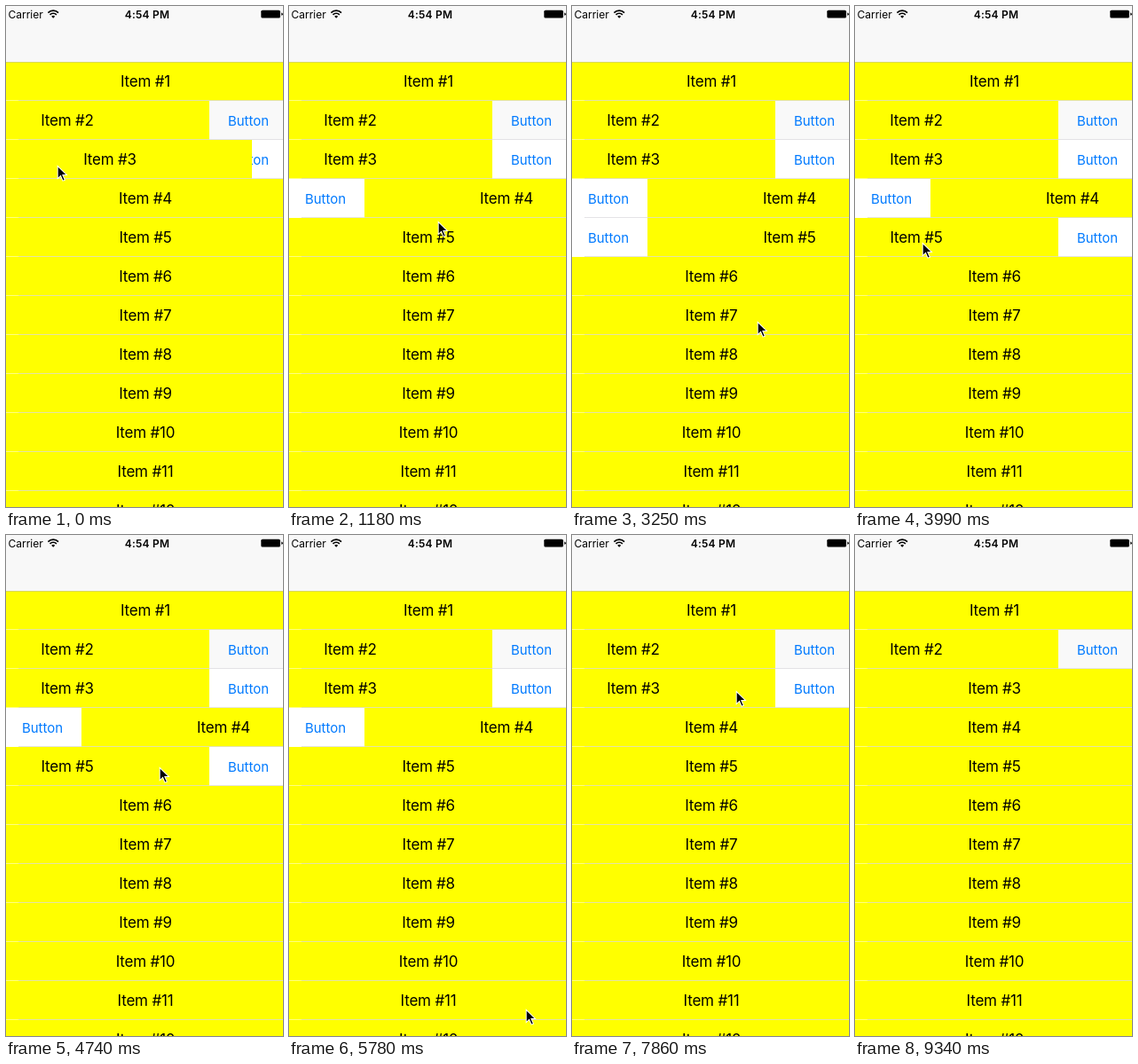
An HTML page for the animation above (9.72 s loop, 312 by 565 pixels).

```html
<!DOCTYPE html>
<html lang="en">
<head>
<meta charset="utf-8">
<title>Swipeable list</title>
<style>
  html, body { margin: 0; width: 100%; height: 100%; overflow: hidden; background: #fff; }
  svg { display: block; width: 312px; height: 565px; }
  text { font-family: Inter, Roboto, "Liberation Sans", sans-serif; }
  .item { font-size: 17px; letter-spacing: -.2px; text-anchor: middle; }
  .button { font-size: 15px; fill: #007aff; text-anchor: middle; }
  .status { font-size: 12px; }
  .clock { font-weight: 600; letter-spacing: .2px; text-anchor: middle; }
</style>
</head>
<body>
<svg viewBox="0 0 312 565">
  <g id="list"></g>
  <rect width="312" height="63" fill="#f8f8f8"/>
  <rect y="63" width="312" height=".5" fill="#b2b2b2"/>
  <text class="status" x="2.5" y="13.5">Carrier</text>
  <g fill="none" stroke="#000" stroke-width="1.7">
    <path d="M47.4 7.6a8.2 8.2 0 0 1 11.6 0"/>
    <path d="M49.5 9.8a5.2 5.2 0 0 1 7.4 0"/>
  </g>
  <path d="M53.2 13.8l-2-2.1a2.9 2.9 0 0 1 4 0z"/>
  <text class="status clock" x="159" y="13.5">4:54 PM</text>
  <rect x="287.3" y="4.8" width="21.6" height="8.8" rx="1.5"/>
  <path d="M310.2 7.6q1.6.3 1.6 1.6t-1.6 1.6z"/>
  <path id="cursor" d="M.7 1.7v11.7l3-2.9 2.6 6 1.4-.6-2.6-5.9h4.1z"
        stroke="#fff" stroke-width="2" paint-order="stroke"/>
</svg>
<script>
const LOOP = 9720, TICK = 148.3, LEAD = 14;
const ROW_H = 44, TOP = 63, OPEN = 88;

const list = document.getElementById("list");
const cursor = document.getElementById("cursor");

function add(parent, tag, attrs, text) {
  const node = document.createElementNS("http://www.w3.org/2000/svg", tag);
  for (const key in attrs) node.setAttribute(key, attrs[key]);
  if (text) node.textContent = text;
  return parent.appendChild(node);
}

// Returns the sliding cover; the buttons stay in place beneath it.
function buildRow(n) {
  const row = add(list, "g", { transform: `translate(0 ${TOP + (n - 1) * ROW_H})` });
  add(row, "rect", { width: 312, height: ROW_H, fill: "#fff" });
  if (n === 2) add(row, "rect", { x: 229, width: 83, height: 43.5, fill: "#f9f9f9" });
  for (const x of [41, 273]) add(row, "text", { class: "button", x, y: 28 }, "Button");
  const cover = add(row, "g", {});
  add(cover, "rect", { x: -3, width: 320, height: 43.5, fill: "#ff0" });
  add(cover, "text", { class: "item", x: 157, y: 28 }, "Item #" + n);
  add(row, "rect", { x: 14, y: 43.5, width: 298, height: .5, fill: "#c8c7cc" });
  return cover;
}

const covers = {};
for (let n = 1; n <= 12; n++) covers[n] = buildRow(n);

// The gesture script: each step follows the one before it.
const steps = [];
let clock = 0;
const wait = ticks => { clock += ticks; };
function go(ticks, x, y, row, dx) {
  steps.push({ start: clock, ticks, x, y, row, dx });
  clock += ticks;
}

go(2, 38, 182, 3, -OPEN);
go(2, 60, 212);
go(3, 158, 221, 4, OPEN);
go(1, 168, 243);
go(1, 172, 246);
go(3, 250, 254, 5, OPEN);
go(4, 255, 529);
go(2, 260, 570);
go(4, 209, 356);
go(1, 208, 278);
wait(1);
go(3, 76, 267, 5, -OPEN);
wait(1);
go(4, 173, 262);
go(2, 222, 262, 5, 0);
wait(2);
go(3, 267, 535);
go(3, 180, 212);
wait(1);
go(3, 153, 212, 4, 0);
wait(2);
go(2, 153, 176);
wait(1);
go(2, 185, 176);
wait(3);
go(2, 205, 176, 3, 0);
wait(1);
go(4, 290, 570);

const mix = (a, b, k) => a + (b - a) * k;
const smooth = k => k * k * (3 - 2 * k);

function poseAt(tick) {
  const pose = { x: 58, y: 180, rows: { 2: -OPEN, 3: -40, 4: 0, 5: 0 } };
  for (const s of steps) {
    if (s.start >= tick) break;
    const k = Math.min(1, (tick - s.start) / s.ticks);
    const eased = s.row ? smooth(k) : k;
    pose.x = mix(pose.x, s.x, eased);
    pose.y = mix(pose.y, s.y, eased);
    if (s.row) pose.rows[s.row] = mix(pose.rows[s.row], s.dx, eased);
  }
  return pose;
}

function move(node, x, y) {
  node.setAttribute("transform", `translate(${Math.round(x)} ${Math.round(y)})`);
}

function draw(time) {
  const pose = poseAt(Math.floor((time % LOOP + LEAD) / TICK));
  move(cursor, pose.x, pose.y);
  for (const n in pose.rows) move(covers[n], pose.rows[n], 0);
}

const start = performance.now();
function loop() {
  draw(performance.now() - start);
  requestAnimationFrame(loop);
}
loop();
</script>
</body>
</html>
```
